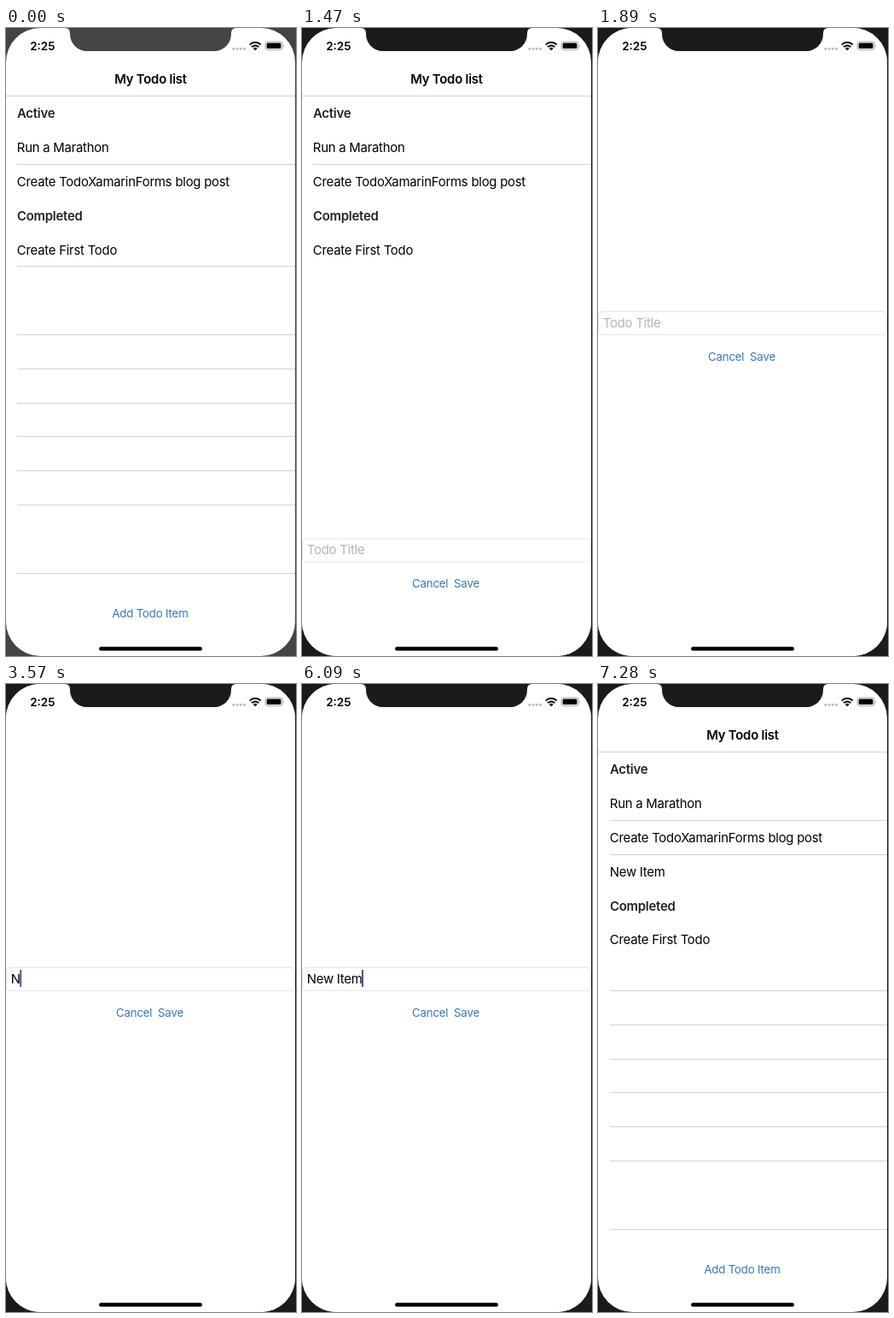
Write an HTML page that moves like this. It is 340 px wide and 734 px high and loops after 8.96 s.

```html
<!DOCTYPE html>
<html lang="en">
<head>
<meta charset="utf-8">
<title>Todo list</title>
<style>
  html, body { margin: 0; width: 100%; height: 100%; overflow: hidden; }
  svg { display: block; width: 340px; height: 734px; }
  text { font: 14.9px Inter, "Liberation Sans", sans-serif; letter-spacing: -.016em; white-space: pre; }
  .bold { font-weight: 600; }
  .head { font-weight: 600; fill: #222; }
  .link { font-size: 13.3px; fill: #3c7ab0; }
  .time { font-size: 13.4px; font-weight: 600; letter-spacing: 0; }
  .rule { stroke: #d2d2d4; }
</style>
</head>
<body>
<svg viewBox="0 0 340 734">
  <clipPath id="glass"><rect width="339" height="734" rx="40"/></clipPath>
  <rect class="bezel" width="340" height="734"/>
  <g clip-path="url(#glass)">
    <rect width="339" height="734" fill="#fff"/>
    <text class="bold" x="169.5" y="65" text-anchor="middle">My Todo list</text>
    <path class="rule" d="M0 79.5H339"/>
    <g id="list"></g>
    <text id="add" class="link" x="169" y="689.3" text-anchor="middle">Add Todo Item</text>
    <g id="sheet">
      <rect width="339" height="740" fill="#fff"/>
      <rect x=".5" y="331.5" width="338" height="27" rx="5" fill="none" stroke="#e6e6e6"/>
      <text id="entry" x="5.8" y="349.6"></text>
      <rect id="caret" y="334" width="2" height="20" fill="#5054a8"/>
      <text class="link" x="129" y="388.7">Cancel</text>
      <text id="save" class="link" x="178" y="388.7">Save</text>
    </g>
  </g>
  <path class="bezel" d="M69 0Q75 0 75 6V7A20 20 0 0 0 95 27H244A20 20 0 0 0 264 7V6Q264 0 270 0Z"/>
  <text class="time" x="28.2" y="25.5">2:25</text>
  <g fill="#bdbdbd">
    <circle cx="266.8" cy="24.3" r="1.5"/><circle cx="271" cy="24.3" r="1.5"/>
    <circle cx="275.2" cy="24.3" r="1.5"/><circle cx="279.4" cy="24.3" r="1.5"/>
  </g>
  <g fill="none" stroke="#000" stroke-width="2">
    <path d="M285.8 19.4A9.3 9.3 0 0 1 298.6 19.4"/>
    <path d="M288.2 22.2A5.8 5.8 0 0 1 296.2 22.2"/>
  </g>
  <path d="M292.2 26.2L289.9 23.9A3.3 3.3 0 0 1 294.5 23.9Z"/>
  <rect x="304" y="16" width="20" height="9.6" rx="2.6" fill="none" stroke="#a2a2a2"/>
  <rect x="305.6" y="17.5" width="16.8" height="6.6" rx="1.4"/>
  <path d="M325.2 19.2Q326.8 20.8 325.2 22.4Z" fill="#a2a2a2"/>
  <rect x="109" y="723.2" width="121" height="4.6" rx="2.3"/>
</svg>
<script>
const LOOP = 8960, STEP = 70, HEIGHT = 734, PITCH = 39.8, RATE = 0.0167;
const $ = id => document.getElementById(id);
const start = performance.now();

const before = ["#Active", "Run a Marathon", "Create TodoXamarinForms blog post",
  "#Completed", "Create First Todo"];
const after = [...before.slice(0, 3), "New Item", ...before.slice(3)];
const emptyRules = [5, 6, 7, 8, 9, 10, 12];

// Each table holds [time, value]; a value lasts until the next entry.
const typed = [[0, 0], [3570, 1], [3850, 2], [3920, 3], [4060, 4],
  [4480, 5], [4620, 6], [4760, 7], [4970, 8]];
const caretAlpha = [[0, 0], [2730, 1], [3290, .7], [3360, .35], [3430, 0], [3570, 1],
  [5530, .7], [5600, .35], [5670, 0], [6090, 1], [6580, 0]];
const addAlpha = [[0, 1], [1260, .17], [1890, 1]];
const saveAlpha = [[0, 1], [6580, .2], [6650, .25], [6720, .3], [6790, .4], [6860, .6]];
const at = (table, t) => table.findLast(([time]) => time <= t)[1];

// Remaining distance of a critically damped spring.
const spring = ms => (1 + RATE * ms) * Math.exp(-RATE * ms);

function sheetTop(t) {
  if (t < 1400 || t > 7000) return HEIGHT;
  if (t < 1890) return HEIGHT * spring(t - 1340);
  return t < 6720 ? 0 : HEIGHT * (1 - spring(t - 6716.7));
}

function listMarkup(rows, innerRules, headX, rowX, ruleX) {
  const texts = rows.map((row, i) => {
    const head = row[0] === "#";
    const y = 105.3 + i * PITCH;
    return `<text class="${head ? "head" : ""}" x="${head ? headX : rowX}" y="${y}">${head ? row.slice(1) : row}</text>`;
  });
  const rules = [...innerRules, ...emptyRules].map(n =>
    `<path class="rule" d="M${ruleX} ${Math.round(159 + (n) * PITCH) + .5}H339"/>`);
  return texts.join("") + rules.join("");
}

const lists = {
  initial: listMarkup(before, [0, 3], 13, 12.8, 13),
  returning: listMarkup(before, [0, 3], 14, 12.8, 14),
  updated: listMarkup(after, [0, 1], 14, 13.8, 14)
};
let shown = "";

function render(t) {
  const state = t < 6580 ? "initial" : t < 7280 ? "returning" : "updated";
  if (state !== shown) {
    $("list").innerHTML = lists[state];
    shown = state;
  }
  const shade = t < 1260 ? "#444" : "#1b1b1b";
  document.querySelectorAll(".bezel").forEach(el => el.setAttribute("fill", shade));

  const count = at(typed, t), entry = $("entry");
  entry.textContent = count ? "New Item".slice(0, count) : "Todo Title";
  entry.setAttribute("fill", count ? "#000" : "#b4b4b6");
  $("caret").setAttribute("x", count ? 5.2 + entry.getComputedTextLength() : 6);
  $("caret").setAttribute("opacity", at(caretAlpha, t));
  $("add").setAttribute("opacity", at(addAlpha, t));
  $("save").setAttribute("opacity", at(saveAlpha, t));
  $("sheet").setAttribute("transform", `translate(0 ${sheetTop(t).toFixed(2)})`);
}

function tick() {
  const t = (performance.now() - start) % LOOP;
  render(Math.floor(t / STEP) * STEP);
  requestAnimationFrame(tick);
}
tick();
</script>
</body>
</html>
```
